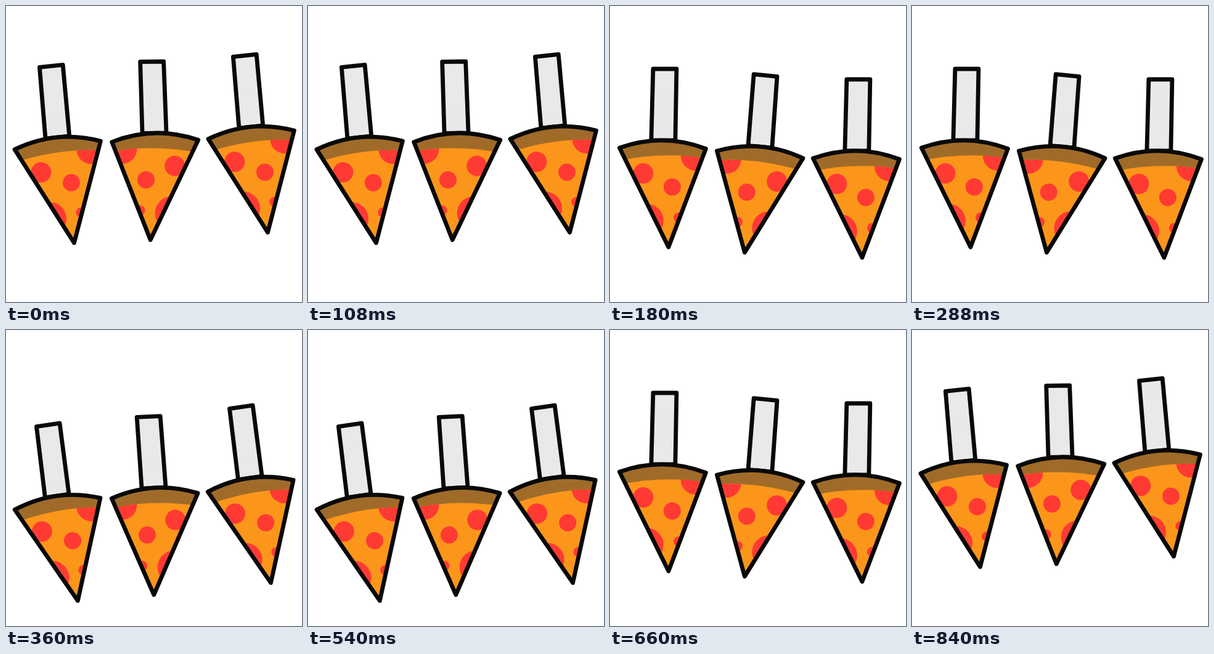
These frames come from a looping animation (480 by 480 pixels, 960 ms). An HTML page with a canvas:

```html
<!DOCTYPE html>
<html lang="en">
<head>
<meta charset="utf-8">
<title>Three dancing slices</title>
<style>
  html, body { margin: 0; width: 100%; height: 100%; overflow: hidden; background: #fff; }
  canvas { display: block; }
</style>
</head>
<body>
<canvas id="stage" width="480" height="480"></canvas>
<script>
const ctx = document.getElementById('stage').getContext('2d');
const LOOP = 960;
const SPACING = 157.2;
const RADIANS = Math.PI / 180;

const stick = new Path2D('M-16-128L22-128L20-12L-19-12Z');
const wedge = new Path2D('M-70.5 0Q0-25 69.5 1.5L9 161Z');
const cheese = new Path2D('M-75 21.5Q5 4.8 75 18V170H-75Z');

function fill(path, color) {
  ctx.fillStyle = color;
  ctx.fill(path);
}

function spot(x, y, radius) {
  const disc = new Path2D();
  disc.arc(x, y, radius, 0, 2 * Math.PI);
  fill(disc, '#ff3a33');
}

function drawTopping() {
  ctx.save();
  ctx.clip(wedge);
  ctx.clip(cheese);
  fill(wedge, '#fc961b');
  spot(-32, 41.5, 16.5);
  spot(15, 63.5, 14);
  spot(53, 13, 24);
  spot(-26, 118, 27);
  spot(25, 113, 8);
  ctx.restore();
}

function drawSlice() {
  fill(stick, '#e9e9e9');
  ctx.stroke(stick);
  fill(wedge, '#a06b29');
  drawTopping();
  ctx.stroke(wedge);
}

// The whole row drops and rocks as one piece.
function poseAt(t) {
  if (t < 180 || t >= 840) return { tilt: -3.1, y: 216.5 };
  if (t < 360 || t >= 660) return { tilt: 3.1, y: 238.5 };
  return { tilt: -5.3, y: 266.5 };
}

function render(t) {
  const { tilt, y } = poseAt(t);
  ctx.fillStyle = '#fff';
  ctx.fillRect(0, 0, 480, 480);
  ctx.strokeStyle = '#090909';
  ctx.lineWidth = 6.8;
  ctx.lineJoin = 'round';

  for (let place = -1; place <= 1; place++) {
    const middle = place === 0;
    ctx.save();
    ctx.translate(242 + 0.28 * tilt, y);
    ctx.rotate(tilt * RADIANS);
    ctx.translate(place * SPACING, middle ? 1.7 : 0);
    ctx.rotate((middle ? 2.4 : -3.1) * RADIANS);
    if (middle) ctx.scale(-1, 1);
    drawSlice();
    ctx.restore();
  }
}

const start = performance.now();
function tick() {
  render((performance.now() - start) % LOOP);
  requestAnimationFrame(tick);
}
tick();
</script>
</body>
</html>
```
